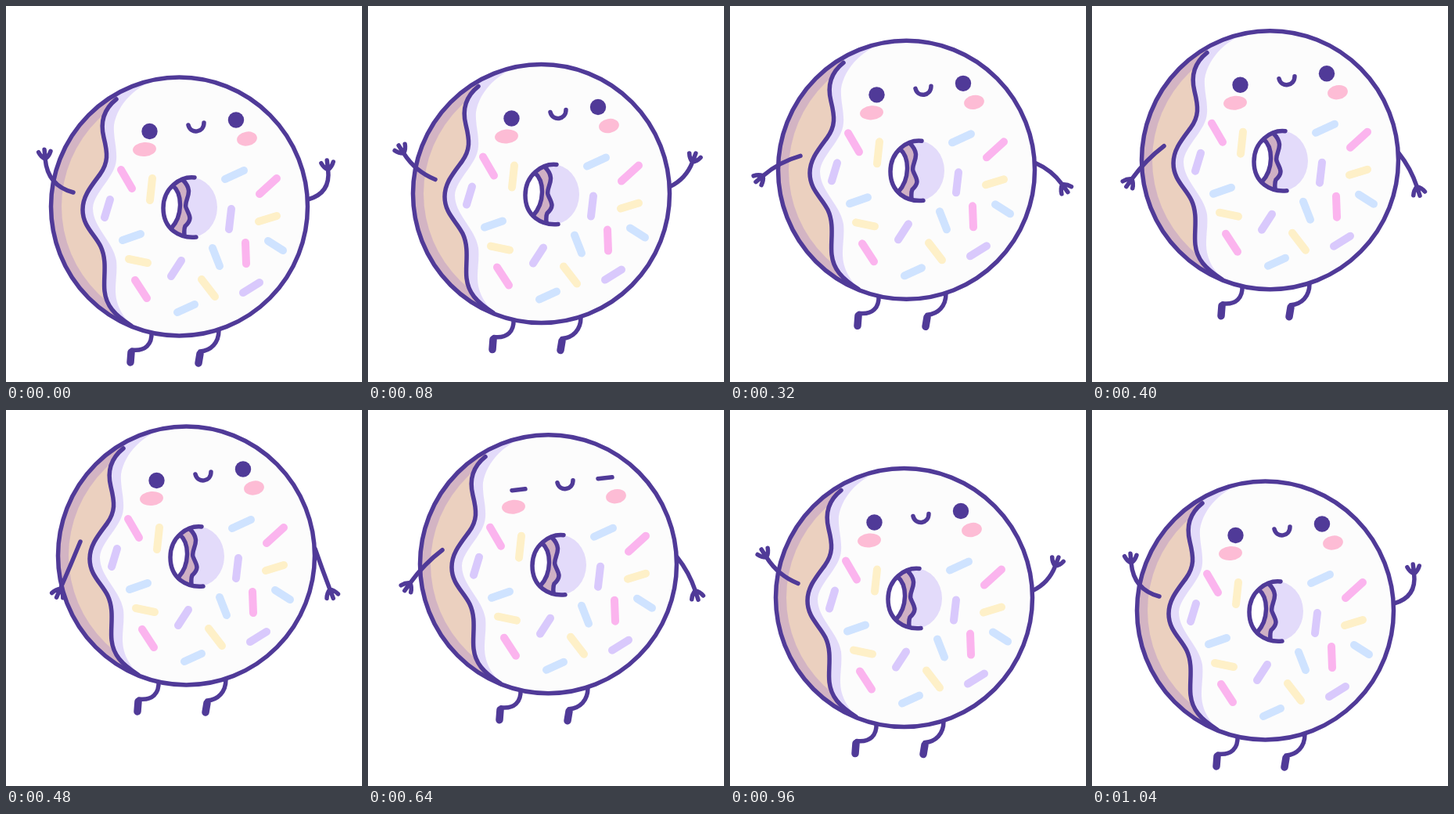
An HTML page for the animation above (1120 ms loop, 455x480 px).

```html
<!DOCTYPE html>
<html lang="en">
<head>
<meta charset="utf-8">
<title>Happy donut</title>
<style>
  html, body { margin: 0; width: 100%; height: 100%; overflow: hidden; background: #fff; }
  svg { display: block; width: 100%; height: 100%; }
  .ink { fill: none; stroke: #503a98; stroke-width: 5.5; stroke-linecap: round; stroke-linejoin: round; }
  .foot { stroke-width: 9.5; }
  .solid { fill: #503a98; }
  .cheek { fill: #fdbcd5; }
  #sprinkles { fill: none; stroke-width: 10; stroke-linecap: round; }
</style>
</head>
<body>
<svg viewBox="0 0 455 480">
  <defs>
    <clipPath id="round"><ellipse cx="221.5" cy="256" rx="164" ry="165"/></clipPath>
    <clipPath id="hole"><ellipse cx="235.5" cy="257" rx="34.5" ry="38.5"/></clipPath>
  </defs>
  <g id="donut">
    <path class="ink" d="M186 416C187 432 178 441 161 439M272 414C272 430 262 440 248 441"/>
    <path class="ink foot" d="M160 442L159 455M248 444L246 456"/>
    <path id="rightArm" class="ink" transform="translate(386 247)"/>

    <g clip-path="url(#round)">
      <rect x="50" y="80" width="345" height="345" fill="#d3b4c3"/>
      <ellipse cx="233" cy="256" rx="162" ry="158" fill="#ebd0bf"/>
      <path id="icing" fill="#e3dbfa"/>
      <path fill="#fcfcfc" d="M215 88C172 94 143 122 138 152C137 168 142 180 141 196C140 218 112 238 111 258C111 283 137 300 141 325C143 345 137 360 142 378C148 398 162 412 190 424L400 430V80Z"/>
      <path id="icingEdge" class="ink"/>
    </g>
    <ellipse class="ink" cx="221.5" cy="256" rx="164" ry="165"/>

    <g clip-path="url(#hole)">
      <rect x="195" y="215" width="80" height="85" fill="#e3dbfa"/>
      <path fill="#cfb0c4" d="M195 215H226V222C242 238 227 247 230 257C233 266 240 271 229 281C227 285 228 290 228 299H195Z"/>
      <path fill="#fff" d="M213 229C226 240 226 268 211 284L195 275V240Z"/>
      <path class="ink" d="M226 222C242 238 227 247 230 257C233 266 240 271 229 281C227 285 228 290 228 294M213 229C226 240 226 268 211 284"/>
    </g>
    <path class="ink" d="M241 219C223 217 201 232 201 258C201 285 222 297 243 295"/>

    <g id="sprinkles">
      <path stroke="#fbb4ee" d="M147 209l14 24M346 220l-22 20M306 302l1 27M165 350l15 23"/>
      <path stroke="#fef0c8" d="M187 220l-3 28M346 268l-23 7M157 323l24 5M250 349l17 22"/>
      <path stroke="#cfe3ff" d="M304 210l-24 11M172 291l-23 8M264 309l9 23M335 300l19 12M241 381l-22 10"/>
      <path stroke="#d9c9fc" d="M133 247l-7 23M288 259l-3 26M224 325l-13 20M324 353l-21 13"/>
    </g>

    <ellipse class="cheek" cx="177" cy="183" rx="15" ry="9" transform="rotate(-5 177 183)"/>
    <ellipse class="cheek" cx="308" cy="169.5" rx="13" ry="9" transform="rotate(-10 308 169.5)"/>
    <path class="ink" d="M233 152C236 164 253 162 253 149"/>
    <g id="openEyes" class="solid"><circle cx="183.5" cy="160" r="10.2"/><circle cx="294" cy="145.5" r="10.2"/></g>
    <path id="closedEyes" class="ink" d="M175 162L192 160M285 147L303 145"/>
    <path id="leftArm" class="ink" transform="translate(86 238) scale(-1 1)"/>
  </g>
</svg>
<script>
const STEP = 80, STEPS = 14, TOP = 6, BLINK_STEP = 8;
const byId = id => document.getElementById(id);

const edge = 'M141 119C122 134 121 152 125 168C130 188 131 200 120 215C108 231 98 243 98 260C98 281 113 291 121 307C130 326 124 347 126 364C128 382 138 394 160 408';
byId('icingEdge').setAttribute('d', edge);
byId('icing').setAttribute('d', edge + 'L200 430H400V80H150Z');

// The point at a distance from [x, y], with angles rising from the outward axis.
function polar([x, y], degrees, distance) {
  const a = degrees * Math.PI / 180;
  return [x + distance * Math.cos(a), y - distance * Math.sin(a)];
}

// An arm from a shoulder at 0,0; the hand carries on along the curve of the arm.
function armPath(angle, reach, pose) {
  const length = reach + (pose - 2.2) ** 2;
  const bend = 1.6 * (pose - 4) ** 2 - 6;
  const wrist = polar([0, 0], angle, length);
  const elbow = polar(polar([0, 0], angle, length / 2), angle - 90, bend);
  const hand = angle + Math.atan2(2 * bend, length) * 180 / Math.PI;
  const palm = polar(wrist, hand, 4);
  const fingers = [-40, 0, 40].map(spread =>
    `M${wrist}Q${polar(wrist, hand + spread * 1.5, 6)} ${polar(wrist, hand + spread, 12)}`);
  return `M0 0Q${elbow} ${wrist}L${palm}` + fingers.join('');
}

function render(time) {
  const step = Math.floor(time / STEP) % STEPS;
  const pose = Math.min(step, TOP, STEPS - 1 - step);
  const rise = pose / TOP;
  const bounce = Math.sin(pose * Math.PI / 4) ** 2 * (1 - rise);

  const sway = Math.round(9 * (Math.min(step, TOP, STEPS - step) / TOP) ** 2);
  const lift = 70 * rise + 11.5 * bounce;
  byId('donut').setAttribute('transform', `translate(${sway} ${-lift})`);

  const leftAngle = 50 - 117 * rise + 22 * bounce;
  const rightAngle = 63 * Math.cos(Math.PI * rise) - 7;
  byId('leftArm').setAttribute('d', armPath(leftAngle, 51, pose));
  byId('rightArm').setAttribute('d', armPath(rightAngle, 41, pose));

  const blink = step === BLINK_STEP;
  byId('openEyes').setAttribute('visibility', blink ? 'hidden' : 'visible');
  byId('closedEyes').setAttribute('visibility', blink ? 'visible' : 'hidden');
}

let start;
function tick(now) {
  start ??= now;
  render(now - start);
  requestAnimationFrame(tick);
}
render(0);
requestAnimationFrame(tick);
</script>
</body>
</html>
```
